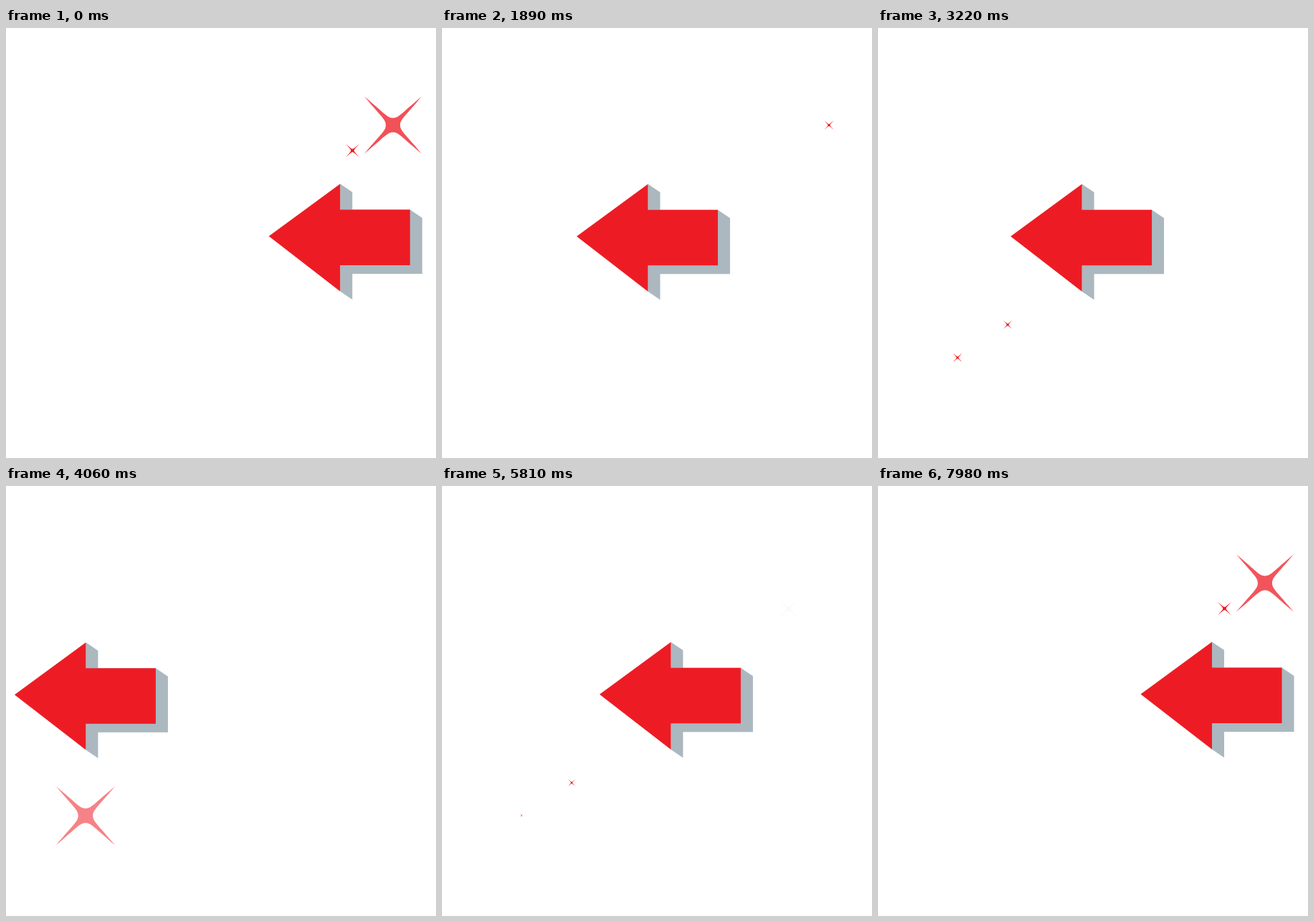
Animation, 600 px wide and 600 px high, one loop 8000 ms. Source, as an HTML page with a canvas:

```html
<!DOCTYPE html>
<html lang="en">
<head>
<meta charset="utf-8">
<title>Sliding arrow with sparkles</title>
<style>
  html, body { margin: 0; width: 100%; height: 100%; overflow: hidden; background: #fff; }
  canvas { display: block; width: 600px; height: 600px; }
</style>
</head>
<body>
<canvas id="stage" width="600" height="600"></canvas>
<script>
const ctx = document.getElementById('stage').getContext('2d');
const LOOP = 8000, STEP = 70, PERIOD = 2658;
const RED = '#ed1c24', GREY = '#abb8c0';
const LEFT = 6, RIGHT = 367.5, LEAD = 41;

// Outlines relative to the arrow tip.
const FACE = [[0, 0], [99.5, -73], [99.5, -37], [197, -37], [197, 40.5], [99.5, 40.5], [99.5, 77]];
const SIDE = [[99.5, -73], [116.5, -61.5], [116.5, -37], [197, -37], [214, -25.5],
              [214, 52.5], [116.5, 52.5], [116.5, 88.5], [99.5, 77]];

const SPARKLES = [
  { x: 540, y: 135.5, size: 83.5, start: 1788, fade: 790 },
  { x: 111, y: 460, size: 83.5, start: 459, fade: 790 },
  { x: 483.5, y: 171, size: 26, start: 2122, fade: 700 },
  { x: 181, y: 414, size: 26, start: 236, fade: 700 }
];
const GROW = 1065, FADE = 340;

const mod = (a, n) => ((a % n) + n) % n;
const clamp = v => Math.min(1, Math.max(0, v));

// Cubic Bezier easing with control points (.4, 0) and (.47, 1).
function ease(x) {
  let lo = 0, hi = 1;
  for (let i = 0; i < 24; i++) {
    const u = (lo + hi) / 2, v = 1 - u;
    const at = 3 * u * v * v * 0.4 + 3 * u * u * v * 0.47 + u * u * u;
    if (at < x) lo = u; else hi = u;
  }
  return lo * lo * (3 - 2 * lo);
}

function polygon(points, color) {
  ctx.beginPath();
  for (const [x, y] of points) ctx.lineTo(x, y);
  ctx.closePath();
  ctx.fillStyle = color;
  ctx.fill();
}

function drawArrow(t) {
  const phase = mod(t + LEAD, PERIOD) / PERIOD * 2;
  const away = phase < 1 ? ease(phase) : 1 - ease(phase - 1);
  ctx.save();
  ctx.translate(RIGHT + (LEFT - RIGHT) * away, 290.5 + 0.7 * away);
  polygon(SIDE, GREY);
  polygon(FACE, RED);
  ctx.restore();
}

function drawSparkle({ x, y, size, start, fade }, t) {
  const age = mod(t - start, PERIOD);
  const alpha = 1 - clamp((age - fade) / FADE);
  if (!alpha) return;
  const half = size / 2 * Math.sin(clamp(age / GROW) * Math.PI / 2);
  ctx.save();
  ctx.globalAlpha = alpha;
  ctx.translate(x, y);
  ctx.scale(half, half);
  ctx.beginPath();
  ctx.moveTo(-1, -1);
  for (let i = 0; i < 4; i++) {
    ctx.bezierCurveTo(-0.28, -0.4, -0.2, -0.25, 0, -0.25);
    ctx.bezierCurveTo(0.2, -0.25, 0.28, -0.4, 1, -1);
    ctx.rotate(Math.PI / 2);
  }
  ctx.fillStyle = RED;
  ctx.fill();
  ctx.restore();
}

function render(now) {
  const t = Math.floor(mod(now, LOOP) / STEP) * STEP;
  ctx.fillStyle = '#fff';
  ctx.fillRect(0, 0, 600, 600);
  drawArrow(t);
  for (const sparkle of SPARKLES) drawSparkle(sparkle, t);
}

const origin = performance.now();
function tick() {
  render(performance.now() - origin);
  requestAnimationFrame(tick);
}
tick();
</script>
</body>
</html>
```
